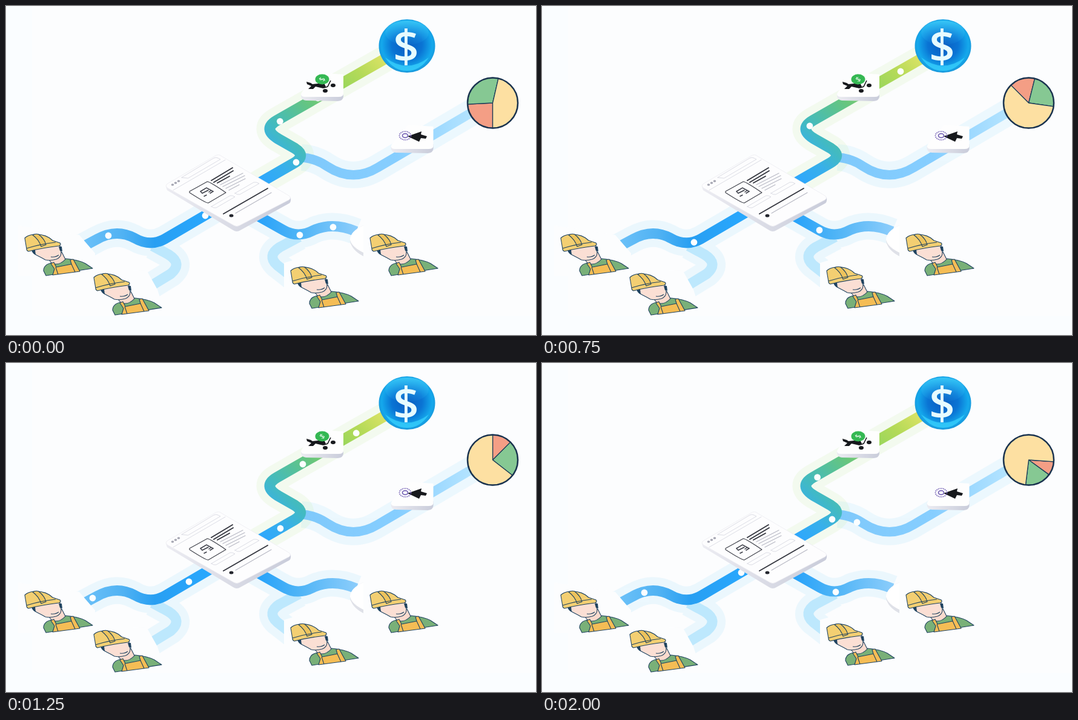
These frames come from a looping animation (875 by 543 pixels, 2.25 s). An HTML page:

```html
<!DOCTYPE html>
<html lang="en">
<head>
<meta charset="utf-8">
<title>Work flow</title>
<style>
html, body { margin: 0; width: 100%; height: 100%; overflow: hidden; background: #fafdff; }
svg { display: block; width: 875px; height: 543px; }
.pipe { fill: none; stroke-width: 17; }
.halo { fill: none; stroke-width: 44; stroke-linejoin: round; opacity: .1; }
.line { fill: none; stroke-linecap: round; }
</style>
</head>
<body>
<svg viewBox="0 0 875 543">
<defs>
  <linearGradient id="main" gradientUnits="userSpaceOnUse" x1="430" y1="290" x2="625" y2="90">
    <stop offset="0" stop-color="#2fa8fb"/><stop offset=".14" stop-color="#38b0ea"/>
    <stop offset=".26" stop-color="#42bac2"/><stop offset=".4" stop-color="#55c09c"/>
    <stop offset=".52" stop-color="#68c67c"/><stop offset=".7" stop-color="#98d65c"/>
    <stop offset=".85" stop-color="#b4da58"/><stop offset="1" stop-color="#d8e264"/>
  </linearGradient>
  <linearGradient id="east" gradientUnits="userSpaceOnUse" x1="495" y1="0" x2="770" y2="0">
    <stop offset="0" stop-color="#7fc9fb"/><stop offset=".55" stop-color="#86ceff"/>
    <stop offset="1" stop-color="#b4e4ff"/>
  </linearGradient>
  <linearGradient id="left" gradientUnits="userSpaceOnUse" x1="130" y1="0" x2="340" y2="0">
    <stop offset="0" stop-color="#6ac0f8"/><stop offset=".3" stop-color="#50b2f3"/>
    <stop offset=".55" stop-color="#289ff2"/><stop offset="1" stop-color="#28a8fe"/>
  </linearGradient>
  <linearGradient id="right" gradientUnits="userSpaceOnUse" x1="415" y1="0" x2="578" y2="0">
    <stop offset="0" stop-color="#27a2fa"/><stop offset=".4" stop-color="#4cb3f6"/>
    <stop offset="1" stop-color="#8accfb"/>
  </linearGradient>
  <linearGradient id="side" x1="0" x2="1" y1="0" y2="0">
    <stop offset="0" stop-color="#ececf2"/><stop offset="1" stop-color="#c9ccda"/>
  </linearGradient>
  <radialGradient id="coin" cx=".5" cy=".48" r=".54">
    <stop offset="0" stop-color="#0a5cc0"/><stop offset=".5" stop-color="#0a74d4"/>
    <stop offset=".83" stop-color="#14a8ec"/><stop offset="1" stop-color="#1d94d6"/>
  </radialGradient>
  <linearGradient id="gloss" x1="0" x2="0" y1="0" y2="1">
    <stop offset="0" stop-color="#40ccf8" stop-opacity=".8"/><stop offset="1" stop-color="#1a9be8" stop-opacity=".1"/>
  </linearGradient>
  <path id="pMain" d="M415 294L476 259Q496 247 477 235L449 219Q423 203 447 189L640 79"/>
  <path id="pEast" d="M488 250Q510 251 530 264.500Q572 292 614 266.500L780 169"/>
  <path id="pLeft" d="M120 401L150 385Q182 367 212 383Q238 398 262 384.500L345 336"/>
  <path id="pRight" d="M410 343L458 370Q482 384 508 370Q540 356 578 372"/>
  <path id="pLeftLow" d="M242 396L268 410Q292 425 272 442L236 464"/>
  <path id="pRightLow" d="M484 381L452 398Q430 412 448 428L475 449"/>
  <g id="worker" stroke="#1f4360" stroke-width="1.1" stroke-linejoin="round">
    <path fill="#79b078" d="M66 445L62 437Q62 427 75 424L99 417Q120 419 131 425L143 433Z"/>
    <path fill="#fbdacd" d="M71 419L76 425Q88 429 98 418L92 406Z"/>
    <path fill="#fbdfd4" d="M45 401Q45 409 52 412Q60 416 65 419Q73 421 83 418Q91 415 91 407L89 395Z"/>
    <path fill="#1f4360" stroke="none" d="M42 403L48 402L49 411Q44 409 42 403ZM87 397L92 397L93 405L89 404Z"/>
    <path fill="#f5bd55" d="M74 425L79 423L83 431L108 426L106 419L111 418L122 438L77 444L80 434Z"/>
    <path fill="none" d="M74 414Q82 415 87 411M82 431L86 443M108 426L114 439"/>
    <path fill="#f3cf72" d="M34 401L31 383Q36 378 46 377Q66 376 77 387L89 391Q92 394 87 396Q61 399 37 405Q34 404 34 401Z"/>
    <path fill="#edc35c" d="M44 378Q49 375 54 377Q64 385 66 394L58 397Q54 385 44 378Z"/>
    <path fill="none" d="M34 400Q56 393 82 390"/>
  </g>
</defs>

<rect x="43" width="832" height="512" fill="#fcfdfe"/>
<g class="halo" stroke="#64c8fb">
  <use href="#pEast"/><use href="#pLeft"/><use href="#pRight"/>
  <use href="#pLeftLow"/><use href="#pRightLow"/>
</g>
<use href="#pMain" class="halo" stroke="#a5e36d"/>
<g class="pipe">
  <use href="#pLeftLow" stroke="#bde8fd"/><use href="#pRightLow" stroke="#bde8fd"/>
  <use href="#pEast" stroke="url(#east)" stroke-width="15.500"/>
  <use href="#pLeft" stroke="url(#left)"/><use href="#pRight" stroke="url(#right)"/>
  <use href="#pMain" stroke="url(#main)" stroke-width="18"/>
</g>
<g id="dots" fill="#fbfeff"></g>

<!-- clear areas behind the workers -->
<g fill="#fcfdfe">
  <path d="M20 362L121 378L147 408V446H20ZM125 440L232 436L250 468L264 512H125ZM459 424L500 412H590V512H459ZM590 360H720V450H590Z"/>
  <path d="M590 362Q568 372 568 388Q571 403 590 413Z" fill="#dfe1e8"/>
  <path d="M590 362Q568 372 568 386Q571 398 590 407Z" fill="#fff"/>
</g>

<!-- browser page -->
<path d="M264 298L266 304L375 370Q381 374 387 370L467 326Q471 324 470 316L380 350Z" fill="url(#side)"/>
<path d="M267 293L346 247Q351 244 356 248L467 313Q472 317 467 320L386 362Q381 365 376 362L266 300Q262 296 267 293Z" fill="#fdfdfe" stroke="#ededf2" stroke-width=".8"/>
<g class="line" stroke="#dcdde5">
  <path d="M276 304L362 254M290 283L343 251Q347 249 350 251L354 253L301 284Z"/>
  <path d="M339 331L370 313Q373 312 378 315L347 333Q343 334 339 331ZM378 309L409 291Q413 290 418 293L386 311Q382 312 378 309Z"/>
  <path stroke="#b9bac5" stroke-width="1.300" d="M354 295L391 276M358 298L394 280M363 301L395 285M368 304L385 295M379 342L438 308"/>
  <path stroke="#34363f" stroke-width="1.900" d="M339 288L374 267M343 291L375 272M349 292L369 281M359 343L432 301"/>
  <path stroke="#44464f" stroke-width="1.200" stroke-linejoin="round" d="M303 306L332 290Q335 289 363 308L334 325Q331 326 303 308Z"/>
  <path stroke="#3a3c46" stroke-width="1.500" d="M321 306L331 300L342 306L337 309M321 306L324 309L334 304M327 314L331 312M335 307L338 305"/>
</g>
<g fill="#a4a5b1">
  <ellipse cx="275" cy="295" rx="2.300" ry="1.700"/><ellipse cx="280" cy="292" rx="2.300" ry="1.700"/><ellipse cx="285" cy="289" rx="2.300" ry="1.700"/>
  <ellipse cx="372" cy="346" rx="3.500" ry="2.500" fill="#24262e"/>
</g>

<!-- tiles -->
<g id="tile">
  <path d="M487 144V149Q488 155 495 156L548 157Q557 156 557 149V142Z" fill="url(#side)"/>
  <path d="M487 145L490 140L515 110L557 113V145Q557 150 549 150H494Q487 150 487 145Z" fill="#fefefe"/>
</g>
<use href="#tile" x="148.500" y="86"/>
<g fill="#17191d">
  <path d="M496 125L503 127L506 129L525 127L528 133L524 136L511 133L507 137L499 137L504 132L497 129Z"/>
  <path d="M525 135L531 133L536 123" fill="none" stroke="#17191d" stroke-width="1.600"/>
  <ellipse cx="540" cy="131" rx="4" ry="3"/><ellipse cx="527" cy="140" rx="4" ry="3"/>
  <path d="M663 215L686 207L685 212L695 215L693 219L685 218L682 224Z"/>
</g>
<ellipse cx="522" cy="121" rx="11.500" ry="8.500" fill="#35b853"/>
<text id="cash" font-family="'Open Sans', sans-serif" font-size="14" fill="#fff" text-anchor="middle">$</text>
<g fill="none" stroke="#7461b5" stroke-width="1.700">
  <ellipse id="ring" cx="659" cy="214" rx="9.500" ry="7"/><ellipse cx="659" cy="214" rx="4.500" ry="3.300"/>
</g>

<!-- coin -->
<ellipse cx="662" cy="66" rx="46.500" ry="44" fill="url(#coin)"/>
<ellipse cx="662" cy="44" rx="36" ry="20" fill="url(#gloss)"/>
<path d="M626 85Q662 112 698 85Q684 107 662 107Q640 107 626 85Z" fill="#38d0fc" opacity=".75"/>
<text x="660.500" y="93" font-family="'Open Sans', 'Noto Sans', sans-serif" font-weight="600" font-size="75" fill="#e6fbff" text-anchor="middle">$</text>

<g id="pie" stroke="#1b3d59" stroke-width="1.300" stroke-linejoin="round"></g>
<circle cx="803.500" cy="160" r="41.500" fill="none" stroke="#1b3450" stroke-width="2.500"/>

<use href="#worker"/><use href="#worker" x="114" y="65"/>
<use href="#worker" x="439" y="54"/><use href="#worker" x="570"/>
</svg>
<script>
const $ = id => document.getElementById(id);
const STEP = 250, STEPS = 9;

// Stops one step apart along each pipe
const tracks = {
  left: [[143,388],[169,379],[196,379],[223,390],[251,390],[276,376],[302,361],[329,346]],
  right: [[540,365],[512,370],[485,378],[458,370],[432,355]],
  main: [[427,288],[453,273],[479,258],[484,239],[449,222],[442,198],[465,181],[490,167],
         [515,152],[541,137],[567,122],[592,108],[616,93]],
  east: [[498,254],[520,263]]
};
// Pulses: track, position at step 0, first step, last step
const pulses = [
  ['left', 1, 0, 6], ['left', 7, 0, 0], ['left', -5, 5, 7], ['left', -7, 8, 8], ['left', -1, 8, 8],
  ['right', 0, 0, 4], ['right', 2, 0, 2], ['right', -6, 7, 8],
  ['main', 2, 0, 7], ['main', 5.45, 0, 6], ['main', 8, 0, 4], ['main', -4, 4, 7],
  ['main', -2.45, 8, 8], ['main', -6, 8, 8], ['east', -7, 7, 8]
];
// Pie edges in degrees from the top: start of red, green and yellow
const edges = [[180,267,373], [180,267,373], [189,275,380], [315,374,458], [360,405,488],
               [360,405,488], [379,426,507], [417,456,527], [454,486,547]];

function place([name, offset, first, last], step) {
  const track = tracks[name], pos = offset + step, i = Math.floor(pos);
  if (step < first || step > last || !track[i]) return '';
  const a = track[i], b = track[i + 1] || a, k = pos - i;
  return `<circle cx="${a[0] + (b[0] - a[0]) * k}" cy="${a[1] + (b[1] - a[1]) * k}" r="5.4"/>`;
}

function slice(from, to, fill) {
  const rim = deg => {
    const a = deg * Math.PI / 180;
    return `${803.5 + 41.5 * Math.sin(a)} ${160 - 41.5 * Math.cos(a)}`;
  };
  return `<path fill="${fill}" d="M803.5 160L${rim(from)}A41.5 41.5 0 ${+(to - from > 180)} 1 ${rim(to)}Z"/>`;
}

const start = performance.now();
let shown = -1;
function draw() {
  const step = Math.floor((performance.now() - start) / STEP) % STEPS;
  if (step !== shown) {
    shown = step;
    const [red, green, yellow] = edges[step];
    $('dots').innerHTML = pulses.map(p => place(p, step)).join('');
    $('pie').innerHTML = slice(red, green, '#f49e85') + slice(green, yellow, '#86c893') +
      slice(yellow, red + 360, '#fde0a2');
    $('ring').setAttribute('stroke-dasharray', [1, 2, 6].includes(step) ? 'none' : '1.6 1.2');
    $('cash').setAttribute('transform',
      `translate(522 121) scale(1 .75) rotate(${step % 4 ? -30 : -65}) translate(0 5)`);
  }
  requestAnimationFrame(draw);
}
draw();
</script>
</body>
</html>
```
